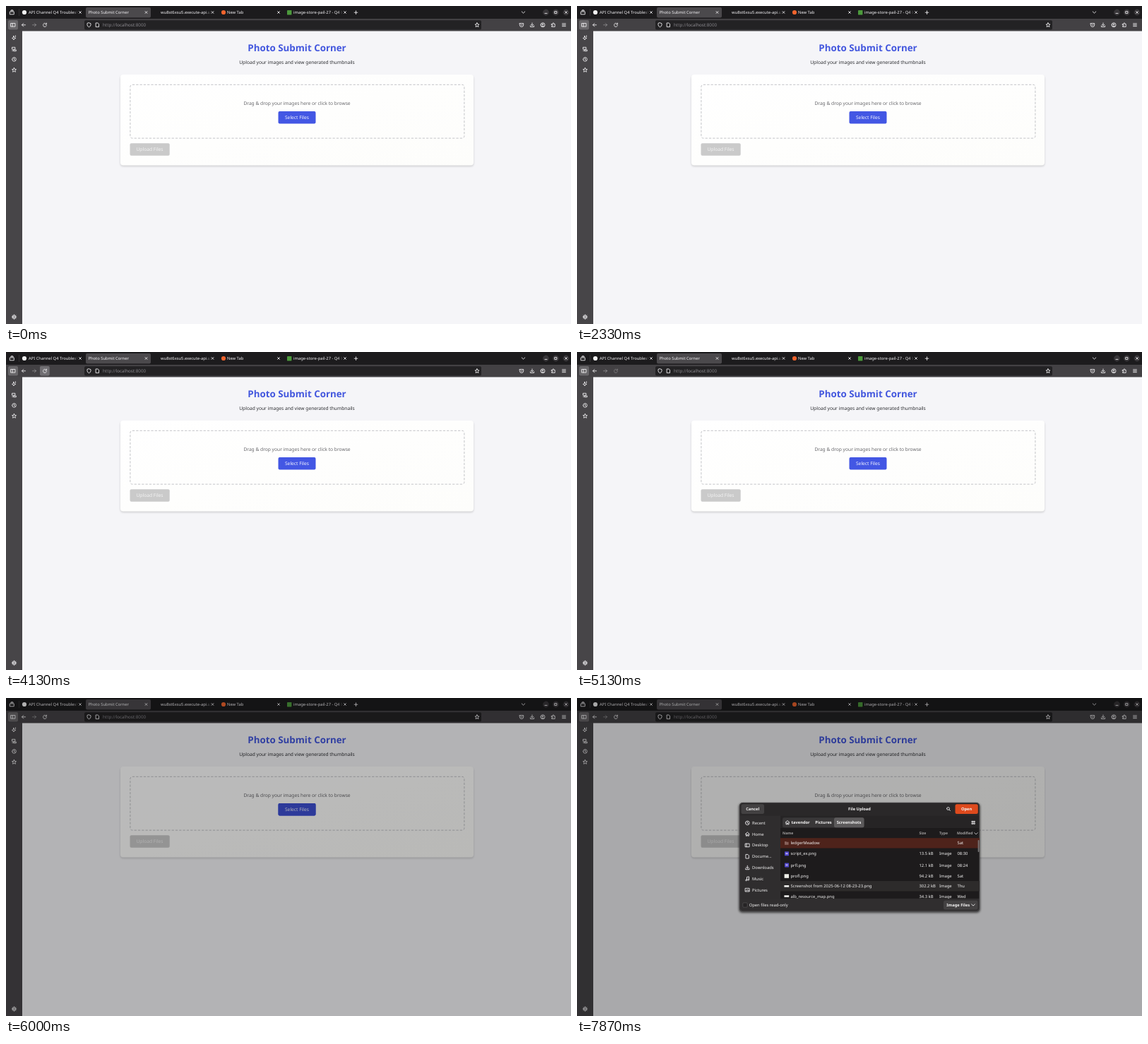
These frames come from a looping animation (800 px wide and 450 px high, 8 s). An HTML page:

```html
<!DOCTYPE html>
<html lang="en">
<head>
<meta charset="utf-8">
<title>Photo Submit Corner</title>
<style>
html, body { margin: 0; width: 100%; height: 100%; overflow: hidden; background: #f5f5f8; }
svg { display: block; width: 100%; height: 100%; }
text { font-family: "Noto Sans", "Open Sans", sans-serif; text-rendering: geometricPrecision; white-space: pre; }
.line { fill: none; stroke: #ecebee; stroke-width: .9; stroke-linecap: round; stroke-linejoin: round; }
</style>
</head>
<body>
<svg id="stage" viewBox="0 0 800 450">
  <defs>
    <filter id="soft" x="-10%" y="-10%" width="120%" height="130%"><feGaussianBlur stdDeviation="1.6"/></filter>
    <linearGradient id="card" x2="1" y2="1"><stop stop-color="#fff"/><stop offset="1" stop-color="#fdfdfb"/></linearGradient>
    <clipPath id="list"><rect x="288" y="184" width="282" height="100"/></clipPath>
    <clipPath id="frame"><rect x="230" y="148" width="340" height="154" rx="5"/></clipPath>
  </defs>
</svg>
<script>
const LOOP = 8000;
const stage = document.getElementById("stage");

// Drawing helpers
const rect = (x, y, w, h, fill, r = 0, more = "") =>
  `<rect x="${x}" y="${y}" width="${w}" height="${h}" rx="${r}" fill="${fill}" ${more}/>`;
const dot = (x, y, r, fill, more = "") => `<circle cx="${x}" cy="${y}" r="${r}" fill="${fill}" ${more}/>`;
const text = (x, y, size, fill, label, more = "") =>
  `<text x="${x}" y="${y}" font-size="${size}" fill="${fill}" ${more}>${label}</text>`;
const line = (x, y, d, more = "") => `<path class="line" transform="translate(${x} ${y})" d="${d}" ${more}/>`;
const group = (id, body, more = "") => `<g id="${id}" ${more}>${body}</g>`;
const ring = r => `M${-r} 0a${r} ${r} 0 1 0 ${2 * r} 0a${r} ${r} 0 1 0 ${-2 * r} 0`;
const BOLD = 'font-weight="700"', MID = 'text-anchor="middle"';

const shape = {
  cross: "M-1.4-1.4L1.4 1.4M1.4-1.4L-1.4 1.4",
  stop: "M-2.2-2.2L2.2 2.2M2.2-2.2L-2.2 2.2",
  plus: "M-2.3 0H2.3M0-2.3V2.3",
  chevron: "M-2.3-1.1L0 1.1L2.3-1.1",
  back: "M2.5 0H-2.5M-.3-2.2L-2.5 0L-.3 2.2",
  forward: "M-2.5 0H2.5M.3-2.2L2.5 0L.3 2.2",
  reload: "M2.1-1.3A2.5 2.5 0 1 0 2.5.5M2.4-2.7V-1H.7",
  star: "M0-3L.9-1L3-.8L1.4.7L1.9 2.8L0 1.7L-1.9 2.8L-1.4.7L-3-.8L-.9-1Z",
  shield: "M0-3L2.5-2V0Q2.3 2.1 0 3Q-2.3 2.1-2.5 0V-2Z",
  page: "M-2-2.8H.7L2-1.4V2.8H-2Z",
  save: "M-2.7-2.2H2.7V0A2.7 2.7 0 0 1-2.7 0ZM-1.3-.6L0 .6L1.3-.6",
  down: "M0-2.8V1M-1.7-.6L0 1.1L1.7-.6M-2.6 1.1V2.7H2.6V1.1",
  clock: ring(2.8) + "M0-1.6V.2L1.3 1",
  home: "M-2.8 0L0-2.7L2.8 0M-2-.5V2.6H-.6V.8H.6V2.6H2V-.5",
  desk: "M-2.8-2.3H2.8V2.3H-2.8ZM-1.2-2.3V2.3",
  photo: "M-2.8-2.3H2.8V2.3H-2.8ZM-2 1.6L-.4-.4L.7.8L1.4 0L2.4 1.6",
  note: "M-.8 1.8V-2.5L2.2-2.9V1.2M-.8 1.8a.9.9 0 1 1-.2-.4M2.2 1.2a.9.9 0 1 1-.2-.4",
  puzzle: "M-2.4-1.3H-.8V-2.2A.8.8 0 0 1 .8-2.2V-1.3H2.2V2.6H-2.4V1.4H-1.4A.7.7 0 0 0-1.4 0H-2.4Z",
  sparkle: "M-.6-2.6L.2-.3L2.4.5L.2 1.3L-.6 3L-1.4 1.3L-3 .5L-1.4-.3ZM2-3V-1.6",
  devices: "M-2.6-2.6H1.4V.2H-2.6ZM-.3 1H2.8V2.8H-.3ZM-2.6 2.2H-1",
  gear: ring(1.1) + ring(2.4) + "M0-3.2V-2.5M0 2.5V3.2M-3.2 0H-2.5M2.5 0H3.2M-2.2-2.2L-1.8-1.8M1.8 1.8L2.2 2.2M-2.2 2.2L-1.8 1.8M1.8-1.8L2.2-2.2",
  person: ring(3) + "M-1.6 2Q0 .3 1.6 2M-.9-.8a.9.9 0 1 0 1.8 0a.9.9 0 1 0-1.8 0",
  menu: "M-2.4-1.9H2.4M-2.4 0H2.4M-2.4 1.9H2.4",
  find: "M-2.4-.5a1.9 1.9 0 1 0 3.8 0a1.9 1.9 0 1 0-3.8 0M.9.9L2.5 2.5",
  grid: "M-2-2H-.7V-.7H-2ZM.7-2H2V-.7H.7ZM-2 .7H-.7V2H-2ZM.7 .7H2V2H.7Z",
  box: "M-2.8-.9H2.8V2.8H-2.8ZM-2-2.2H2M-1-3.2H1",
  panel: "M-3-2.3H3V2.3H-3ZM-.9-2.3V2.3"
};
const icon = (name, x, y, more) => line(x, y, shape[name], more);

function tabs() {
  let fades = "";
  const title = (x, label, end) => {
    fades += `<linearGradient id="fade${x}" gradientUnits="userSpaceOnUse" x1="${end - 7}" x2="${end}">
      <stop stop-color="#f4f3f6"/><stop offset="1" stop-color="#f4f3f6" stop-opacity="0"/></linearGradient>`;
    return text(x, 11.2, 5.8, `url(#fade${x})`, label);
  };
  const body = rect(0, 0, 800, 18.5, "#1c1b1d") +
    rect(20, 2, 92, 15, "#39373a", 2, 'id="tabHover" opacity="0"') +
    rect(113, 2, 92, 14.5, "#4b494c", 2) +
    icon("box", 8.5, 9) + '<path d="M18.5 4V14" stroke="#444246" stroke-width=".6"/>' +
    dot(26, 9, 3.1, "#f2f2f2") + title(32, "API Channel Q4 Troubleshooting", 102) +
    group("tabTitle", text(116.5, 11.2, 5.8, "#f4f3f6", "Photo Submit Corner")) +
    dot(118, 9, 1.1, "#8fb4ee", 'id="busy" opacity="0"') +
    title(219, "wu8st6xsu5.execute-api.us", 290) +
    dot(308, 9, 3.1, "#f0642d") + text(313, 11.2, 5.8, "#f4f3f6", "New Tab") +
    rect(398, 6, 6.4, 6.4, "#4c9a3c", .4) + title(407, "image-store-pail-27 - Q4 b", 477) +
    [105, 198.5, 292.5, 386, 480].map(x => icon("cross", x, 9)).join("") +
    icon("plus", 495.5, 9.2) + icon("chevron", 732.5, 9) +
    [764.5, 778.5, 793].map(x => dot(x, 9, 4.4, "#383639")).join("") +
    line(764.5, 10.4, "M-1.5 0H1.5") + line(778.5, 9, "M-1.4-1.4H1.4V1.4H-1.4Z") + icon("cross", 793, 9);
  return `<defs>${fades}</defs>` + body;
}

function toolbar() {
  return rect(0, 18, 800, 18, "#434144") + rect(0, 35, 23, 415, "#474548") +
    rect(3, 20, 14, 13.5, "#69676a", 2) + icon("panel", 10, 26.8) +
    rect(48, 20, 13.6, 13.6, "#5c5a5d", 2, 'id="reloadHover" opacity="0"') +
    rect(48, 20, 13.6, 13.6, "#706e72", 2, 'id="reloadPress" opacity="0"') +
    icon("back", 25, 26.8) + icon("forward", 40, 26.8, 'opacity=".4"') +
    icon("reload", 55, 26.8, 'id="reload"') + icon("stop", 55, 26.8, 'id="stop" opacity="0"') +
    rect(111, 20.3, 562, 13.2, "#232224", 2) +
    icon("shield", 117.5, 26.8) + icon("page", 129.5, 26.8) +
    text(137, 29, 6.27, "#858388", 'http://<tspan fill="#918f94">localhost</tspan>:8000') +
    icon("star", 667, 26.8) +
    ["save", "down", "person", "puzzle", "menu"].map((n, i) => icon(n, 730 + i * 15, 26.8)).join("") +
    [["sparkle", 45], ["devices", 61], ["clock", 75.5], ["star", 90.5], ["gear", 440]]
      .map(([n, y]) => icon(n, 11.5, y)).join("");
}

function page() {
  return rect(23, 35.5, 777, 414.5, "#f5f5f8") +
    text(412, 64.4, 13.33, "#4357de", "Photo Submit Corner", BOLD + MID.replace("text", " text")) +
    text(412, 81.5, 6.67, "#2d2e32", "Upload your images and view generated thumbnails", MID) +
    rect(162, 99, 500, 128, "#000", 4, 'opacity=".16" filter="url(#soft)"') +
    rect(162, 97, 500, 128.5, "url(#card)", 4) +
    rect(175.9, 111.3, 473, 75.8, "none", 3, 'stroke="#c3c4c8" stroke-width="1" stroke-dasharray="3.3 2"') +
    text(412, 139.5, 6.67, "#67676b", "Drag &amp; drop your images here or click to browse", MID) +
    rect(385.5, 149, 53, 17.6, "#4357e4", 2) +
    rect(385.5, 149, 53, 17.6, "#3d4fd3", 2, 'id="pickHover" opacity="0"') +
    text(412, 160, 6.67, "#f6f6ff", "Select Files", MID) +
    rect(175.5, 194.2, 56.2, 17.6, "#cacaca", 2) +
    text(203.5, 205.3, 6.67, "#f3f3f3", "Upload Files", MID) +
    group("status", rect(23, 439, 73, 11, "#39373a", 1) + text(26, 446.6, 5.8, "#f4f3f6", "Waiting for localhost…"), 'opacity="0"');
}

const ROWS = [
  // centre, name, size, type, modified
  [205.3, "ledgerMeadow", "", "", "Sat"],
  [220.3, "script_ex.png", "13.5 kB", "Image", "08:30"],
  [236.4, "prfl.png", "12.1 kB", "Image", "08:24"],
  [252, "profl.png", "94.2 kB", "Image", "Sat"],
  [266.2, "Screenshot from 2025-06-12 08-23-23.png", "302.2 kB", "Image", "Thu"],
  [280.4, "alb_resource_map.png", "34.3 kB", "Image", "Wed"]
];

function thumb(i, y) {
  if (i === 0) return `<path d="M294 ${y - 2.4}h2.2l.8 .8h2.6v4h-5.6z" fill="#87615b"/>`;
  if (i < 3) return rect(294, y - 3, 6, 6, "#4f48c8", .6) + rect(295.4, y - 1.2, 3.2, 2.2, "#b9a6e8", .8);
  return i === 3 ? rect(293.6, y - 2.8, 6.4, 5.6, "#efefe9") : rect(293.4, y - 1.2, 6.8, 2.6, "#f1f1ee");
}

function dialog() {
  const white = "#f4f3f3", size = 5.83;
  const bold = (x, y, label, more = "") => text(x, y, 5.75, white, label, BOLD + " " + more);
  const places = [["clock", "Recent"], ["home", "Home"], ["desk", "Desktop"], ["page", "Docume…"],
    ["down", "Downloads"], ["note", "Music"], ["photo", "Pictures"]]
    .map(([n, label], i) => icon(n, 241.3, 176.8 + i * 15.8, 'stroke-width=".7"') +
      text(248, 178.8 + i * 15.8, size, white, label)).join("");
  const rows = ROWS.map(([y, name, bytes, type, when], i) =>
    rect(288, y - 7.2, 282, 14.4, i ? "#2d2b2b" : "#5a2a21", 0, `id="row${i}" opacity="0"`) +
    thumb(i, y) + text(302.5, y + 2.1, size, white, name) + text(484.5, y + 2.1, size, white, bytes) +
    text(513, y + 2.1, size, white, type) + text(538.5, y + 2.1, size, white, when)).join("");
  const heads = [[291, "Name"], [484.5, "Size"], [513, "Type"], [538, "Modified"]]
    .map(([x, label]) => text(x, 193.2, 5.1, "#a3a1a1", label, BOLD)).join("");
  return rect(229, 149, 342, 155, "#000", 5, 'opacity=".6" filter="url(#soft)"') +
    `<g clip-path="url(#frame)">` +
    rect(230, 148, 340, 154, "#2f2d2e") + rect(230, 148, 340, 18.5, "#2a2829") +
    rect(288, 166.5, 282, 18, "#262425") + rect(288, 184, 282, 100, "#1d1b1c") +
    rect(230, 283.8, 340, 19, "#302e2f") + `</g>` +
    rect(230.3, 148.3, 339.4, 153.4, "none", 5, 'stroke="#555354" stroke-width=".6"') +
    rect(232.5, 150.3, 32.5, 13.6, "#434142", 2.5) + bold(248.7, 159, "Cancel", MID) +
    bold(400, 159, "File Upload", MID) + icon("find", 526, 157) +
    rect(535.5, 150.3, 32.3, 13.6, "#de4a1d", 2.5) + bold(551.6, 159, "Open", MID) +
    rect(291, 169.3, 115.5, 14, "#393738", 2.5) + rect(364, 169.3, 42.5, 14, "#5c5a5b", 2.5) +
    icon("home", 298, 176.2) + bold(303.5, 178.3, "tavendor") + bold(337.3, 178.3, "Pictures") +
    bold(367.7, 178.3, "Screenshots") + icon("grid", 561.3, 176.3) + places + heads +
    icon("chevron", 565, 191.8, 'stroke-width=".7" opacity=".8"') +
    `<g clip-path="url(#list)">` + rect(288, 198.2, 282, 14.3, "#4e231b") + rows + `</g>` +
    rect(567.7, 201, 1.7, 17, "#7b797a", .8, 'id="thumb" opacity="0"') +
    rect(234.8, 289.8, 6.4, 6.4, "#262425", 1.2, 'stroke="#5c5a5b" stroke-width=".6"') +
    text(243.7, 295, size, white, "Open files read-only") +
    rect(519, 286.5, 48.5, 13, "#434142", 2.5) + bold(523.3, 295, "Image Files") + icon("chevron", 561, 293);
}

stage.insertAdjacentHTML("beforeend", tabs() + toolbar() + page() +
  rect(0, 0, 800, 450, "#000", 0, 'id="dim" opacity="0"') + group("dialog", dialog(), 'opacity="0"'));

// Motion: steps are [ms, value]; a repeated time makes a hard change
function track(id, prop, steps) {
  const all = [[0, steps[0][1]], ...steps, [LOOP, steps[steps.length - 1][1]]];
  document.getElementById(id).animate(
    all.map(([ms, value]) => ({ offset: ms / LOOP, [prop]: value })),
    { duration: LOOP, iterations: Infinity }
  ).startTime = 0;
}
const flash = (id, on, off, a = 0, b = 1) =>
  track(id, "opacity", [[on, a], [on, b], [off, b], [off, a]]);
const fade = (id, ...steps) => track(id, "opacity", steps);
const slide = x => `translateX(${x}px)`;

fade("pickHover", [2600, 0], [2800, 1], [2930, 1], [3130, 0], [5200, 0], [5400, 1]);
flash("tabHover", 3270, 3600);
flash("reloadHover", 3930, 4600);
flash("reloadPress", 4130, 4270);

// Page reload
flash("stop", 4270, 4600);
fade("reload", [4270, 1], [4270, 0], [4600, 0], [4600, .35], [5200, .35], [5200, 1]);
flash("busy", 4270, 4600);
flash("status", 4330, 4600);
track("busy", "transform", [[4270, slide(0)], [4435, slide(5)], [4600, slide(0)]]);
track("tabTitle", "transform", [[4270, slide(0)], [4270, slide(9)], [4600, slide(9)], [4600, slide(0)]]);

// File dialog
fade("dim", [5600, 0], [6000, .27], [6130, .31]);
fade("dialog", [6590, 0], [6590, 1]);
track("dialog", "transform", [[6590, "scaleY(.2)"], [6640, "scaleY(.85)"], [6700, "scaleY(1)"]]);
document.getElementById("dialog").style.transformOrigin = "400px 225px";
fade("thumb", [7070, 0], [7270, 1]);
[7070, 7200, 7360, 7530, 7670].forEach((ms, i, all) => {
  const steps = [[ms, 0], [ms + 130, 1]];
  if (i < all.length - 1) steps.push([all[i + 1], 1], [all[i + 1] + 130, 0]);
  fade("row" + i, ...steps);
});
</script>
</body>
</html>
```
